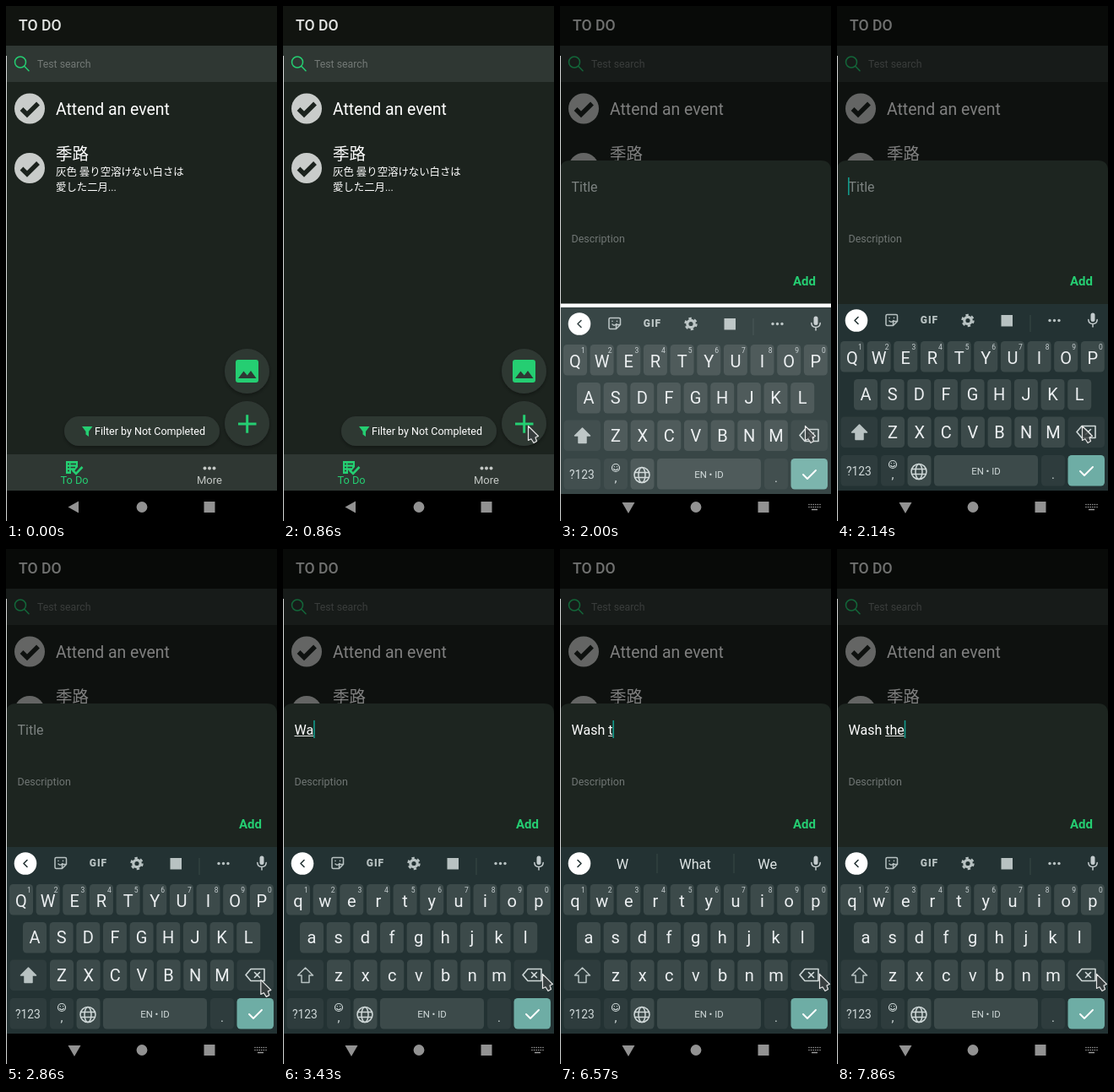
Animation of 321 by 610 pixels, one loop 8 s. Source, as an HTML page:

```html
<!DOCTYPE html>
<html lang="en">
<head>
<meta charset="utf-8">
<title>To do app</title>
<style>
html, body { margin: 0; width: 100%; height: 100%; overflow: hidden; background: #000; }
svg { display: block; width: 100%; height: 100%; }
text { font-family: Roboto, "Noto Sans CJK JP", "Noto Sans CJK", sans-serif; white-space: pre; }
.mid { text-anchor: middle; }
.line { fill: none; stroke-linecap: round; stroke-linejoin: round; }
</style>
</head>
<body>
<svg viewBox="0 0 321 610">
  <defs>
    <g id="done">
      <circle r="18" fill="#c9ccca"/>
      <path d="M-9.5 .5L-3 7L10 -6" fill="none" stroke="#1c231e" stroke-width="5.4"/>
    </g>
    <filter id="shade" x="-20%" y="-20%" width="140%" height="150%">
      <feDropShadow dx="0" dy="2" stdDeviation="2" flood-opacity=".35"/>
    </filter>
  </defs>

  <rect width="321" height="610" fill="#1c231e"/>
  <rect width="321" height="47" fill="#111410"/>
  <text x="15" y="29" font-size="17.6" font-weight="500" fill="#e2e4e2">TO DO</text>
  <rect y="47" width="321" height="43" fill="#2f3733"/>
  <path class="line" d="M21.7 71.2L27 76.7M23.5 66.5a6.5 6.5 0 1 1 -13 0a6.5 6.5 0 1 1 13 0" stroke="#25ce72" stroke-width="1.5"/>
  <text x="37" y="73" font-size="12.3" fill="#737976">Test search</text>
  <use href="#done" x="28" y="121.5"/>
  <use href="#done" x="28" y="192"/>
  <g fill="#fff">
    <text x="59" y="129" font-size="19.4">Attend an event</text>
    <text x="59" y="182" font-size="19.5" lang="ja">季路</text>
    <text x="59" y="201" font-size="12.4" lang="ja">灰色 曇り空溶けない白さは</text>
    <text x="59" y="219" font-size="12.4" lang="ja">愛した二月...</text>
  </g>

  <g filter="url(#shade)">
    <rect x="69" y="486" width="184" height="35" rx="17.5" fill="#2f3733"/>
    <circle cx="285.5" cy="432.5" r="26.5" fill="#2f3733"/>
  </g>
  <path d="M90 498H102.5L98 504V510L94.5 507.5V504Z" fill="#25ce72"/>
  <text x="105" y="508" font-size="12.5" fill="#fff">Filter by Not Completed</text>
  <rect x="272" y="419" width="27" height="27" rx="3" fill="#25ce72"/>
  <path d="M275 441L281.5 432.5L285.8 437.5L290 432L296.5 441Z" fill="#2f3733"/>
  <g id="plus">
    <circle cx="285.5" cy="494.5" r="26.5" fill="#2f3733" filter="url(#shade)"/>
    <path d="M275 495H296.5M285.7 484.3V505.7" stroke="#25ce72" stroke-width="3"/>
  </g>

  <rect y="531" width="321" height="43" fill="#2f3733"/>
  <g fill="#25ce72">
    <path d="M71 539H85V546L80 552L77 549.5V554H71Z"/>
    <path d="M73 542.5H75M76.5 542.5H83M73 546.5H75M76.5 546.5H82M73 550.5H75" stroke="#2f3733" stroke-width="1.5"/>
    <path d="M79 550L83 554L90.5 546" fill="none" stroke="#25ce72" stroke-width="2.6"/>
    <text class="mid" x="81" y="566" font-size="12.8">To Do</text>
  </g>
  <g fill="#c4c8c5">
    <circle cx="235.5" cy="547.5" r="2"/><circle cx="241" cy="547.5" r="2"/><circle cx="246.5" cy="547.5" r="2"/>
    <text class="mid" x="241" y="566" font-size="13">More</text>
  </g>

  <rect id="dim" width="321" height="574" fill="#000"/>
  <g id="sheet">
    <path d="M0 574V416Q0 404 12 404H309Q321 404 321 416V574Z" fill="#1d2520"/>
    <text id="hint" x="13.5" y="441" font-size="16" fill="#7c8280">Title</text>
    <text id="typed" x="13.5" y="441" font-size="16" fill="#fff"></text>
    <rect id="under" y="442" height="1" fill="#e4e6e5"/>
    <rect id="caret" y="424" width="1.6" height="21" fill="#12998a"/>
    <text x="13.5" y="501" font-size="12.5" fill="#707674">Description</text>
    <text x="276" y="552" font-size="15" font-weight="700" fill="#25ce72">Add</text>
  </g>

  <rect y="574" width="321" height="36"/>
  <g fill="#929292">
    <path id="back"/>
    <circle cx="161" cy="593.5" r="6.4"/>
    <rect x="234.5" y="587" width="13" height="13"/>
    <path id="ime" class="line" d="M295 590.5H308M295 593.5H308" stroke="#a0a0a0" stroke-width="1.6" stroke-dasharray="0 2.6"/>
    <path id="imeBar" d="M298 596.5H305" stroke="#a0a0a0" stroke-width="1.4"/>
  </g>

  <rect id="flash" y="352.5" width="321" height="225.5" fill="#fff"/>
  <g id="board">
    <rect y="353" width="321" height="221" fill="#233233"/>
    <circle cx="23" cy="372.5" r="13.3" fill="#fff"/>
    <path id="chevron" class="line" stroke="#233233" stroke-width="1.6"/>
    <g id="tools" fill="#b8c2c2">
      <path class="line" d="M59.5 365.5H70Q71.500 365.500 71.500 367V373.500L66.500 378.500H59.500Q58 378.500 58 377V367Q58 365.500 59.500 365.500M71.500 373.500H68Q66.500 373.500 66.500 375V378.500M62 373Q64.500 375.500 67 372.500M62 369.300V369.400M67.500 369.300V369.400" stroke="#b8c2c2" stroke-width="1.5"/>
      <text class="mid" x="109.5" y="376" font-size="12" font-weight="900" letter-spacing="1">GIF</text>
      <g fill="none" stroke="#b8c2c2">
        <circle cx="155" cy="372.5" r="4.2" stroke-width="3.2"/>
        <circle cx="155" cy="372.5" r="6.5" stroke-width="2.4" stroke-dasharray="3.4 3.407"/>
      </g>
      <rect x="194.5" y="366" width="13.5" height="13.5"/>
      <rect x="228.5" y="366" width="1" height="20" fill="#394846"/>
      <circle cx="252" cy="372.5" r="1.7"/><circle cx="257.5" cy="372.5" r="1.7"/><circle cx="263" cy="372.5" r="1.7"/>
    </g>
    <g id="words" fill="#dfe5e5" font-size="16.3">
      <rect x="114.5" y="361" width="1" height="23" fill="#394846"/>
      <rect x="205.5" y="361" width="1" height="23" fill="#394846"/>
      <text class="mid" x="74" y="378.5"></text>
      <text class="mid" x="160" y="378.5"></text>
      <text class="mid" x="245.7" y="378.5"></text>
    </g>
    <rect x="300.5" y="363.5" width="5" height="10.5" rx="2.5" fill="#c4ccce"/>
    <path class="line" d="M297.8 371.5Q298 376.500 303 376.500T308.200 371.500M303 377V380" stroke="#c4ccce" stroke-width="1.5"/>
    <g id="keys"></g>
    <path id="shift" d="M26.5 496L35.500 505H31V513.500H22V505H17.500Z" stroke="#b8c2c2" stroke-width="1.5" stroke-linejoin="round"/>
    <path class="line" d="M284 505L290 498H306V512H290ZM294.500 502L300.500 508M300.500 502L294.500 508" transform="translate(0 -.5)" stroke="#cfd8d8" stroke-width="1.6"/>
    <g class="line" stroke="#cfd8d8" stroke-width="1.2">
      <circle cx="66" cy="543" r="4.5"/>
      <path d="M63.7 544.5Q66 547 68.300 544.500M64.400 541.500V541.700M67.600 541.500V541.700"/>
      <g transform="translate(97 551.5)" stroke-width="1.5">
        <circle r="9"/><ellipse rx="4" ry="9"/>
        <path d="M-8.2 -3H8.200M-8.200 3H8.200"/>
      </g>
      <path d="M288 551L293 556L303 546" stroke="#fff" stroke-width="1.9"/>
    </g>
    <g class="mid" fill="#cfd8d8">
      <text x="26" y="555.5" font-size="13.8">?123</text>
      <text x="66" y="560" font-size="15">,</text>
      <text x="176.5" y="554.500" font-size="11.4">EN • ID</text>
      <text x="256" y="560" font-size="15">.</text>
    </g>
  </g>

  <path id="mouse" d="M.5 .5V17.5L4 15.8L7 20.5L10.5 18.5L9 14L12.5 12.5Z" fill="#3a3f40" fill-opacity=".8" stroke="#e6e6e6" stroke-width="1.2" stroke-linejoin="round"/>
  <rect y="59" width="1" height="551" fill="#d4d6d5"/>
</svg>

<script>
const $ = id => document.getElementById(id);
const show = (id, on) => $(id).setAttribute('display', on ? 'inline' : 'none');
const set = (id, name, value) => $(id).setAttribute(name, value);
const move = (id, x, y) => set(id, 'transform', `translate(${x} ${y})`);
const clamp = v => Math.max(0, Math.min(1, v));

// Keyboard: three letter rows, then the wide keys
const box = (x, y, w, fill) => `<rect x="${x}" y="${y}" width="${w}" height="36.5" rx="4.5" fill="${fill}"/>`;
const rows = [['QWERTYUIOP', 18, 397, 424], ['ASDFGHJKL', 34, 442, 467], ['ZXCVBNM', 66, 486.5, 511.5]];
const plain = '#3c4a4a', dark = '#2e3c3d';
let keys = '';
for (const [letters, x0, top, base] of rows)
  [...letters].forEach((c, i) => {
    const x = x0 + i * 31.65;
    keys += box(x - 14, top, 28, plain) +
      `<text class="mid letter" x="${x}" y="${base}" font-size="20" fill="#eceff1">${c}</text>`;
    if (top === 397)
      keys += `<text class="mid" x="${x + 9.5}" y="406.5" font-size="8.5" fill="#c4ccce">${(i + 1) % 10}</text>`;
  });
for (const [x, y, w, fill] of [
  [4.5, 486.5, 43.5, dark], [273.5, 486.5, 43.5, dark], [4.5, 532, 43.5, dark], [52, 532, 28, dark],
  [83.5, 532, 28, plain], [115, 532, 123, plain], [242, 532, 28, dark], [273.5, 532, 43.5, '#6eada5']
]) keys += box(x, y, w, fill);
$('keys').innerHTML = keys;
const letters = [...document.querySelectorAll('.letter')];
const words = [...document.querySelectorAll('#words text')];

// [tick, typed text, underlined from, to]
const typing = [
  [0, '', 0, 0], [22, 'W', 0, 0], [24, 'Wa', 0, 2], [28, 'Was', 0, 2], [34, 'Wash', 0, 3],
  [40, 'Wash ', 0, 4], [46, 'Wash t', 5, 6], [50, 'Wash th', 5, 7], [55, 'Wash the', 5, 8]
];
const blinks = [[19, 22], [32, 34], [38, 40], [44, 46]];

function drawText(k) {
  const [, str, from, to] = typing.filter(s => s[0] <= k).pop();
  const el = $('typed');
  el.textContent = str.replace(/ /g, '\u00a0');
  const at = n => 13.5 + (n ? el.getSubStringLength(0, n) : 0);
  show('hint', !str);
  set('under', 'x', at(from));
  set('under', 'width', at(to) - at(from));
  set('caret', 'x', at(str.length) - (str ? 0 : .5));
  show('caret', k >= 15 && !blinks.some(([a, b]) => k >= a && k < b));
}

function drawMouse(k) {
  const p = clamp((k - 16) / 6);
  const rise = 5 * (1 - clamp((k - 2) / 4));
  show('mouse', k >= 2);
  move('mouse', 290 + 17 * p, 497 + rise + 6 * p + 40 * p * (1 - p));
}

function draw(k) {
  const open = 1 - (1 - clamp((k - 8) / 4)) ** 2;
  const press = k > 1 && k < 6 ? Math.sin(Math.PI * (k - 1) / 5) : 0;
  set('plus', 'opacity', 1 - .6 * press);
  set('dim', 'opacity', .5 * open);
  show('sheet', k > 8);
  move('sheet', 0, k < 14 ? 170 * (1 - open) : -221);

  const ime = k >= 11;
  set('back', 'd', ime ? 'M73.5 588H88.5L81 601Z' : 'M73.5 593.5L86 586.5V600.5Z');
  show('ime', ime);
  show('imeBar', ime);

  const rising = k === 14;
  show('flash', rising);
  show('board', k >= 14);
  move('board', 0, rising ? 4 : 0);
  set('board', 'opacity', rising ? .9 : 1);

  const lower = k >= 24;
  for (const el of letters)
    el.textContent = lower ? el.textContent.toLowerCase() : el.textContent.toUpperCase();
  set('shift', 'fill', lower ? 'none' : '#b8c2c2');

  const suggest = k >= 28 && k < 55;
  show('tools', !suggest);
  show('words', suggest);
  set('chevron', 'd', suggest ? 'M21 368.5L25 372.5L21 376.5' : 'M25 368.5L21 372.5L25 376.5');
  const list = k < 51 ? ['W', 'What', 'We'] : ['t', 'the', 'to'];
  words.forEach((el, i) => el.textContent = list[i]);

  drawText(k);
  drawMouse(k);
}

// Seven ticks per second, 56 to a loop
let last = -1;
const start = performance.now();
function frame(now) {
  const k = Math.floor((Math.max(0, now - start) + 6) * 7 / 1000) % 56;
  if (k !== last) draw(last = k);
  requestAnimationFrame(frame);
}
draw(0);
requestAnimationFrame(frame);
</script>
</body>
</html>
```
